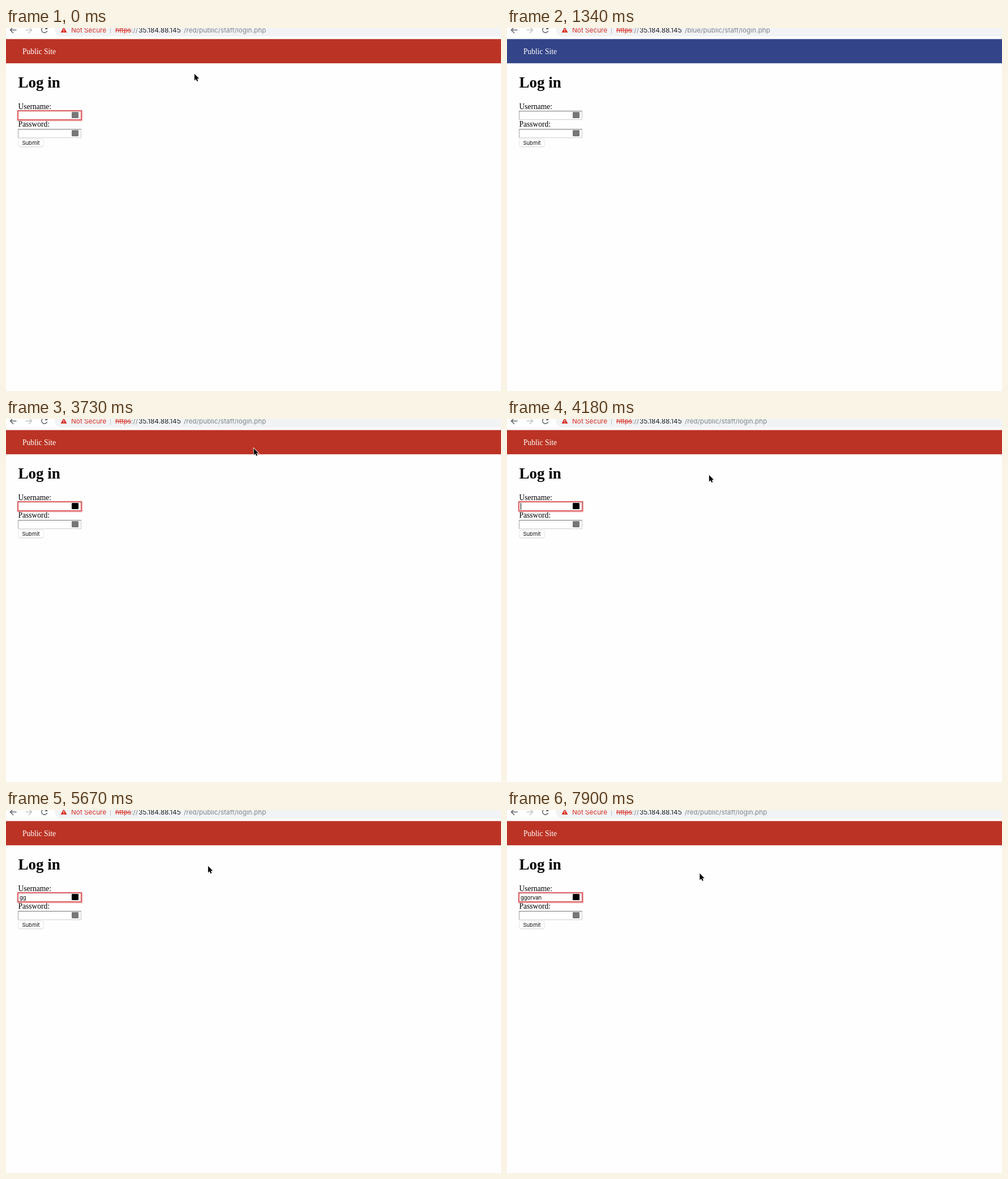
These frames come from a looping animation (874x640 px, 8 s). An HTML page:

```html
<!DOCTYPE html>
<html lang="en">
<head>
<meta charset="utf-8">
<title>Log in</title>
<style>
  html, body { margin: 0; width: 100%; height: 100%; overflow: hidden; background: #fff; }
  #stage { position: absolute; left: 0; top: 0; width: 874px; height: 640px; overflow: hidden; background: #fefefe; }
  svg { position: absolute; left: 0; top: 0; }
  .ui { font: 11.75px Inter, "Liberation Sans", sans-serif; }
  .page { font: 13.52px "Liberation Serif", serif; }
  .page .title { font-size: 27.04px; font-weight: bold; }
  .small { font: 9.45px Inter, "Liberation Sans", sans-serif; }
  .field {
    position: absolute; left: 21px; width: 112px; box-sizing: border-box;
    background: #fff; border: 1px solid; border-color: #777 #c9c9c9 #cfcfcf #a2a2a2;
  }
  #user { top: 146px; height: 16px; }
  #pass { top: 178px; height: 15.5px; }
  #user.focus { border-color: #d4565a; box-shadow: 0 0 0 1px #e4686a, 0 0 2px 1.5px #f0a5a5; }
  .badge { position: absolute; left: 94px; top: 1px; width: 12px; height: 11px; border-radius: 1px; background: #777; }
  .badge.active { background: #000; }
  .entry { position: absolute; left: 2px; top: 1px; height: 12px; display: flex; line-height: 14px; white-space: pre; color: #000; }
  #caret { width: 1px; height: 12px; background: #000; }
  #submit {
    position: absolute; left: 22px; top: 196px; width: 44px; height: 13px; border-radius: 3px;
    background: #fff; box-shadow: 0 0 0 .5px #d4d4d4, 0 .6px 1px #b5b5b5;
    text-align: center; line-height: 13px; color: #111;
  }
</style>
</head>
<body>
<div id="stage">
  <svg width="874" height="640" viewBox="0 0 874 640">
    <rect width="874" height="20" fill="#fff"/>
    <rect x="86" y="-9" width="820" height="24" rx="12" fill="#f1f3f4"/>
    <g fill="none" stroke="#5f6368" stroke-width="1.5">
      <path d="M18.5 3.5H8M13-2L7.5 3.5L13 9"/>
      <path d="M34.5 3.5H45M40-2L45.5 3.5L40 9" stroke="#c0c3c6"/>
      <path d="M72 .2A5.1 5.1 0 1 0 72.7 5"/>
    </g>
    <path d="M73.2-3V2.3H68z" fill="#5f6368"/>
    <path d="M102-2L107.5 8H96.5z" fill="#d93025"/>
    <path d="M102 1.5V4.6M102 5.5V6.8" stroke="#fff" stroke-width="1.1"/>
    <path d="M184.5-3V10" stroke="#bdc1c6"/>
    <g class="ui" fill="#80868b">
      <text x="115" y="8" fill="#d93025">Not Secure</text>
      <text x="193" y="8"><tspan fill="#d93025" text-decoration="line-through">https</tspan>://</text>
      <text x="234" y="8" fill="#202124">35.184.88.145</text>
      <text id="path" x="314" y="8"></text>
    </g>
    <rect id="banner" y="19.5" width="874" height="42.7"/>
    <g class="page">
      <text x="29" y="46" fill="#fff">Public Site</text>
      <text class="title" x="21.5" y="105">Log in</text>
      <text x="21.5" y="142.5">Username:</text>
      <text x="21.5" y="174">Password:</text>
    </g>
  </svg>
  <div id="user" class="field">
    <div class="entry small"><span id="typed"></span><i id="caret"></i></div>
    <div id="badge" class="badge"></div>
  </div>
  <div id="pass" class="field"><div class="badge"></div></div>
  <div id="submit" class="small">Submit</div>
  <svg width="874" height="640" viewBox="0 0 874 640">
    <g id="pointer">
      <path d="M.5 1V13L3.2 10.5L5 14.6L7.2 13.7L5.4 9.8H9z" fill="#000" opacity=".16"/>
      <path d="M0 0V11.8L2.7 9.3L4.4 13.3L6.4 12.4L4.7 8.6H8.3z" stroke="#fff" stroke-width="1.6" paint-order="stroke"/>
    </g>
  </svg>
</div>
<script>
  const LOOP = 8000;
  const LOGIN = "ggorvan";
  const keyTimes = [4920, 5220, 5960, 6260, 6700, 7000, 7300];
  const caretSpans = [[440, 1040], [3290, 3730], [4180, 4780], [4920, 5670], [5960, 7900]];
  const blueSpan = [1340, 3290];
  // [start time, x, y]; no position means hidden
  const pointerStops = [[0, 332.7, 80.7], [140], [3730, 437.5, 51.7], [3880, 356.8, 98.7], [7900, 340.3, 111.7]];

  const el = id => document.getElementById(id);
  const [path, banner, user, typed, caret, badge, pointer] =
    ["path", "banner", "user", "typed", "caret", "badge", "pointer"].map(el);
  const within = (t, [from, to]) => t >= from && t < to;
  const show = (node, on) => { node.style.visibility = on ? "visible" : "hidden"; };

  function render(t) {
    const blue = within(t, blueSpan);
    path.textContent = `/${blue ? "blue" : "red"}/public/staff/login.php`;
    banner.setAttribute("fill", blue ? "#334488" : "#bb3324");
    user.classList.toggle("focus", !blue);
    badge.classList.toggle("active", t >= blueSpan[1]);
    typed.textContent = LOGIN.slice(0, keyTimes.filter(k => t >= k).length);
    show(caret, caretSpans.some(span => within(t, span)));

    const [, x, y] = pointerStops.filter(([start]) => t >= start).pop();
    show(pointer, x !== undefined);
    if (x !== undefined) pointer.setAttribute("transform", `translate(${x} ${y})`);
  }

  function tick() {
    render(performance.now() % LOOP);
    requestAnimationFrame(tick);
  }
  tick();
</script>
</body>
</html>
```
